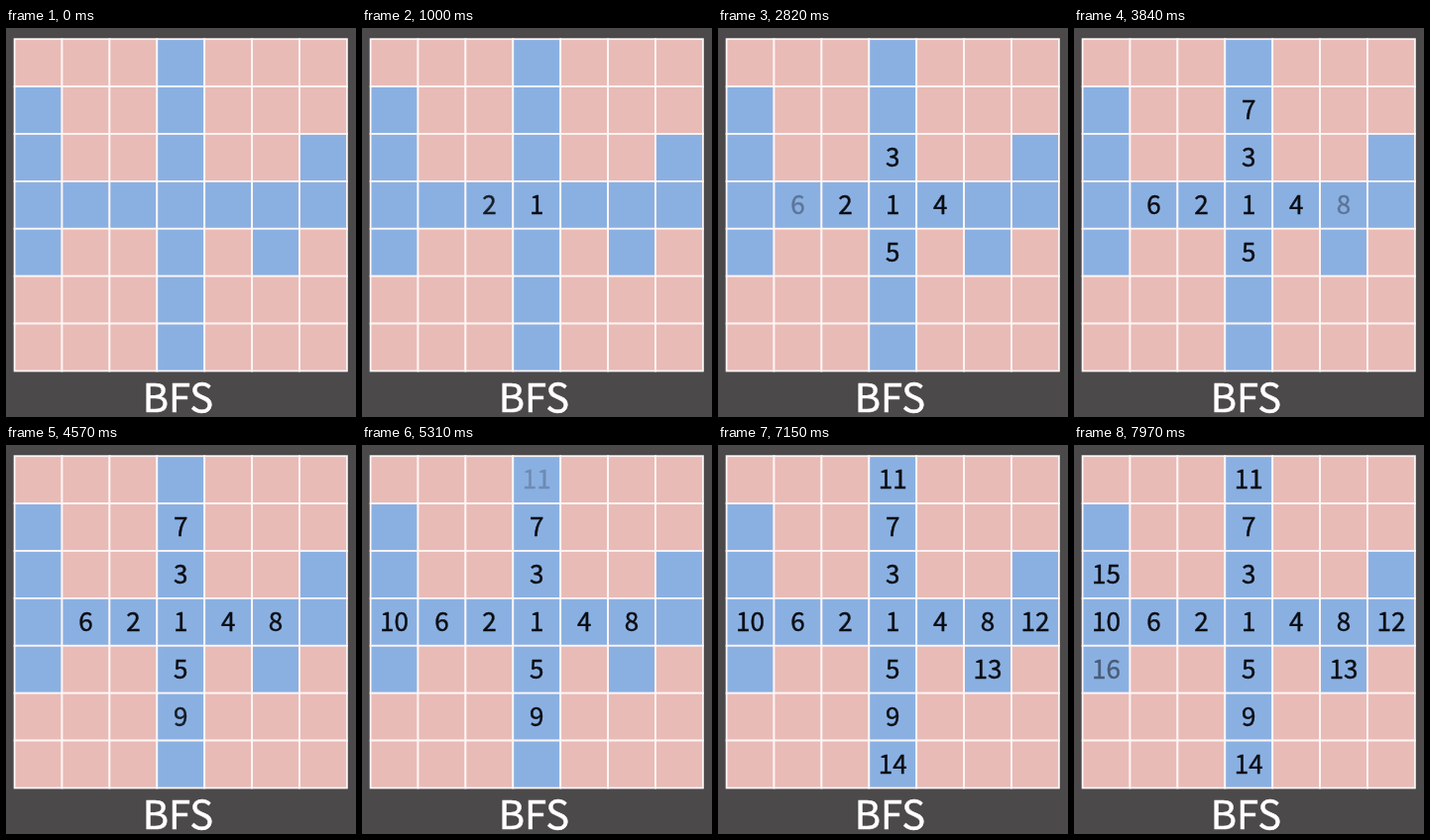
Recreate the animation shown at these times as an HTML page. Size 353 px wide and 393 px high, loop 8000 ms.

```html
<!DOCTYPE html>
<html lang="en">
<head>
<meta charset="utf-8">
<title>BFS</title>
<style>
html, body { margin: 0; width: 100%; height: 100%; overflow: hidden; background: #4b494a; }
svg { display: block; width: 353px; height: 393px; }
text { font-family: "Noto Sans CJK SC", "Noto Sans CJK JP", "Noto Sans CJK", "Noto Sans", sans-serif; text-anchor: middle; }
.step { font-size: 26px; fill: #0b0d12; stroke: #0b0d12; stroke-width: .4px; }
.title { font-size: 40px; fill: #fff; stroke: #fff; stroke-width: .5px; }
</style>
</head>
<body>
<svg viewBox="0 0 353 393"></svg>
<script>
const LOOP = 8000, FIRST = 133, INTERVAL = 509, FADE = 400;
const CELL = 47.9, LEFT = 8.6, TOP = 11.2;
const map = [
  '...#...',
  '#..#...',
  '#..#..#',
  '#######',
  '#..#.#.',
  '...#...',
  '...#...'
];
// Visiting order as column-row pairs
const order = '33 23 32 43 34 13 31 53 35 03 30 63 54 36 02 04'.split(' ');

const svg = document.querySelector('svg');
function add(tag, attrs, content = '') {
  const el = document.createElementNS('http://www.w3.org/2000/svg', tag);
  for (const key in attrs) el.setAttribute(key, attrs[key]);
  el.textContent = content;
  return svg.appendChild(el);
}

map.forEach((line, row) => [...line].forEach((mark, col) => add('rect', {
  x: LEFT + col * CELL, y: TOP + row * CELL, width: CELL, height: CELL,
  fill: mark === '#' ? '#8ab0e2' : '#e9bbb6', stroke: '#fdf6f6', 'stroke-width': 1.8
})));
add('text', { class: 'title', x: 173.5, y: 388 }, 'BFS');

const steps = order.map(([col, row], i) => add('text', {
  class: 'step', x: LEFT + (+col + .5) * CELL, y: TOP + (+row + .5) * CELL + 9.2
}, i + 1));

function draw(now) {
  const t = now % LOOP;
  steps.forEach((step, i) => {
    const progress = (t - FIRST - i * INTERVAL) / FADE;
    step.setAttribute('opacity', Math.min(1, Math.max(0, progress)));
  });
  requestAnimationFrame(draw);
}
draw(performance.now());
</script>
</body>
</html>
```
